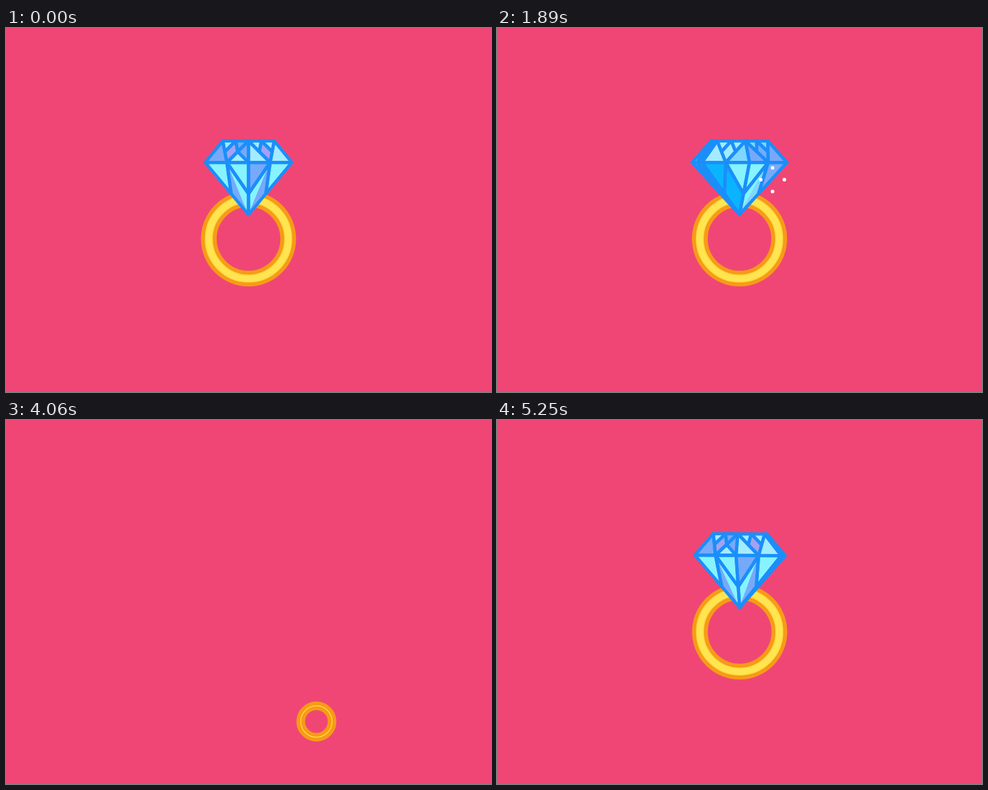
Write an HTML page with a canvas that moves like this. It is 800x600 px and loops after 5.32 s.

```html
<!DOCTYPE html>
<html lang="en">
<head>
<meta charset="utf-8">
<title>Diamond ring</title>
<style>
html, body { margin: 0; width: 100%; height: 100%; overflow: hidden; background: #f04675; }
canvas { display: block; }
</style>
</head>
<body>
<canvas id="stage" width="800" height="600"></canvas>
<script>
const ctx = document.getElementById('stage').getContext('2d');
const LOOP = 5320, STEP = 70, RAD = Math.PI / 180;
const LEAP = 2240, SHRINK = 2870, GONE = 3570, BACK = 4060, FALL = 4500, LOW = 4980;

const part = (t, from, to) => Math.min(1, Math.max(0, (t - from) / (to - from)));
const smooth = u => u * u * (3 - 2 * u);
const easeOut = u => Math.sin(u * Math.PI / 2);
const mix = (a, b, u) => a + (b - a) * u;

// The ring leaps up, tips over and shrinks away.
function leaving(t) {
  const up = smooth(part(t, LEAP, 2900)), p = part(t, SHRINK, GONE);
  const tilt = -27 * up - 33 * p;
  return {
    x: 400 + 52 * easeOut(p),
    y: 347.6 - 89.5 * up + 30 * smooth(p),
    scale: 1 - p * p, gem: 1,
    tilt, lean: tilt, gap: 40 + 23 * up * up + 12 * p, pitch: 0
  };
}

// The ring is thrown back in, grows, then drops and settles under the stone.
function arriving(t) {
  const fly = easeOut(part(t, BACK, FALL));
  const fall = smooth(part(t, FALL, LOW)), rest = smooth(part(t, LOW, LOOP));
  const late = fall * fall;
  const tilt = mix(-36, 3.5, late) - 3.5 * rest;
  return {
    x: mix(512, 374, fly) + 28 * fall - 2 * rest,
    y: mix(497, 285, fly) + 77 * fall - 14.4 * rest,
    scale: mix(.395, 1, easeOut(part(t, BACK, 4270))),
    gem: smooth(part(t, BACK, 4340)),
    tilt, lean: tilt * .3, gap: mix(95, 40, late), pitch: 9 * (1 - late)
  };
}

const tones = {
  a: '#a3ebff', c: '#86f3ff', s: '#7fd6ff', l: '#a5a1f2',
  p: '#77a9fb', b: '#0ab4ff', q: '#3fe0ff'
};
// Per side: crown left, small, kite, small, right; pavilion left, right; lower kite halves.
const sides = ['aalaapccp', 'aaaaasscc', 'apppasbqs', 'aaaasbcbb', 'pspspcpcs', 'palppccpc'];

// Heights are measured from the tip of the stone.
const GIRDLE = { r: 82.5, y: -86 }, TABLE = { r: 49, y: -121.5 };
const MIDDLE = { r: GIRDLE.r * .4, y: GIRDLE.y * .4 };
const corner = (ring, i, spin) => {
  const a = (i * 60 + spin) * RAD;
  return [ring.r * Math.sin(a), ring.y, ring.r * Math.cos(a)];
};
const mid = (a, b) => a.map((v, k) => (v + b[k]) / 2);

function facetsOf(spin) {
  const list = [], tip = [0, 0, 0];
  const add = (tone, pts, line = true) => list.push({ fill: tones[tone], pts, line });
  sides.forEach((tone, j) => {
    const g0 = corner(GIRDLE, j, spin), g1 = corner(GIRDLE, j + 1, spin);
    const t0 = corner(TABLE, j, spin), t1 = corner(TABLE, j + 1, spin);
    const m0 = corner(MIDDLE, j, spin), m1 = corner(MIDDLE, j + 1, spin);
    const k = mid(g0, g1), n = mid(t0, t1), s0 = mid(t0, k), s1 = mid(t1, k);
    add(tone[0], [g0, t0, k]);
    add(tone[1], [t0, n, s0]);
    add(tone[2], [n, s1, k, s0]);
    add(tone[3], [n, t1, s1]);
    add(tone[4], [t1, g1, k]);
    if (j === 5) add('a', [s1, g1, k]);
    add(tone[5], [g0, k, m0]);
    add(tone[6], [k, g1, m1]);
    add(tone[7], [k, tip, m0], false);
    add(tone[8], [k, m1, tip], false);
    list.push({ pts: [k, m1, tip, m0], line: true });
  });
  add('a', sides.map((_, j) => corner(TABLE, -j, spin)));
  return list;
}

function drawGem(x, y, size, tilt, pitch, spin) {
  const ct = Math.cos(tilt * RAD), st = Math.sin(tilt * RAD);
  const cp = Math.cos(pitch * RAD), sp = Math.sin(pitch * RAD);
  const project = ([px, py, pz]) => {
    const v = py * cp - pz * sp;
    return [x + size * (px * ct - v * st), y + size * (px * st + v * ct)];
  };
  const area = p => p.reduce((sum, [ax, ay], i) => {
    const [bx, by] = p[(i + 1) % p.length];
    return sum + ax * by - bx * ay;
  }, 0);
  const seen = facetsOf(spin)
    .map(f => ({ ...f, flat: f.pts.map(project) }))
    .filter(f => area(f.flat) > .5);
  const trace = p => {
    ctx.beginPath();
    p.forEach(([a, b]) => ctx.lineTo(a, b));
    ctx.closePath();
  };
  ctx.lineJoin = 'round';
  for (const f of seen) if (f.fill) {
    trace(f.flat);
    ctx.fillStyle = ctx.strokeStyle = f.fill;
    ctx.lineWidth = .7;
    ctx.fill();
    ctx.stroke();
  }
  ctx.strokeStyle = '#1b8efa';
  ctx.lineWidth = 5.2;
  for (const f of seen) if (f.line) {
    trace(f.flat);
    ctx.stroke();
  }
}

function circle(x, y, r, width, color) {
  ctx.beginPath();
  ctx.arc(x, y, r, 0, 2 * Math.PI);
  ctx.lineWidth = width;
  ctx.strokeStyle = color;
  ctx.stroke();
}

function drawBand(x, y, s) {
  const outer = 75.25 * s, inner = 55.75 * s, r = (outer + inner) / 2, w = outer - inner;
  circle(x, y, r, w, '#ffd943');
  circle(x, y, r, w * .5, '#ffe54f');
  circle(x, y, outer, 6.5, '#f79b17');
  circle(x, y, inner, 6.5, '#f79b17');
}

// Four strokes fly outwards and shorten to dots.
function drawBurst(age, x, y) {
  if (age < 0 || age >= 4 * STEP) return;
  const u = (age / STEP + 1) / 4;
  const near = 19.5 * u ** 1.4, far = 19.5 * easeOut(u) + .01;
  ctx.strokeStyle = '#fff';
  ctx.lineWidth = 6;
  ctx.lineCap = 'round';
  for (let i = 0; i < 4; i++) {
    const dx = Math.cos(i * 90 * RAD), dy = Math.sin(i * 90 * RAD);
    ctx.beginPath();
    ctx.moveTo(x + dx * near, y + dy * near);
    ctx.lineTo(x + dx * far, y + dy * far);
    ctx.stroke();
  }
}

function draw(t) {
  ctx.fillStyle = '#f04675';
  ctx.fillRect(0, 0, 800, 600);
  if (t >= GONE && t < BACK) return;
  const { x, y, scale, gem, tilt, lean, gap, pitch } = t < GONE ? leaving(t) : arriving(t);
  const spin = 360 * t / LOOP + 4 * Math.sin(Math.PI * t / LOOP);
  const reach = gap * scale, size = scale * gem;
  drawBand(x, y, scale);
  if (size > .03) {
    drawGem(x + reach * Math.sin(lean * RAD), y - reach * Math.cos(lean * RAD), size, tilt, pitch, spin);
  }
  drawBurst(t - 560, 352.5, 263);
  drawBurst(t - 1120, 418, 186);
  drawBurst(t - 1680, 454.5, 250);
}

const begin = performance.now();
function frame() {
  const t = (performance.now() - begin) % LOOP;
  draw(Math.floor(t / STEP) * STEP);
  requestAnimationFrame(frame);
}
frame();
</script>
</body>
</html>
```
